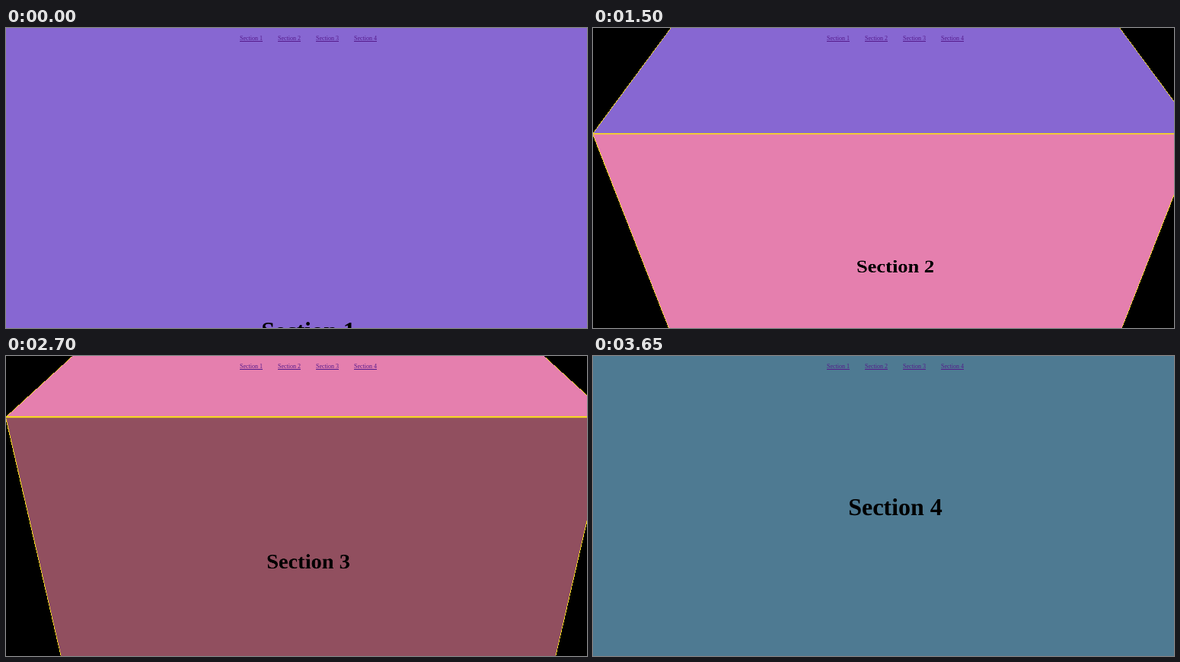
An HTML page for the animation above (4.65 s loop, 763x394 px).

```html
<!DOCTYPE html>
<html lang="en">
<head>
<meta charset="utf-8">
<title>Folding sections</title>
<style>
  html, body { margin: 0; width: 100%; height: 100%; overflow: hidden; background: #000; }
  #stage { position: relative; width: 763px; height: 394px; overflow: hidden; font-family: "Liberation Serif", Times, serif; }
  .slot { position: absolute; left: 0; top: 0; width: 794px; perspective: 500px; }
  .face { width: 100%; height: 100%; display: flex; align-items: center; justify-content: center; outline: 1px solid #f3dc1c; will-change: transform; }
  h1 { margin: 0; font-size: 32px; font-weight: bold; color: #000; white-space: nowrap; }
  nav { position: absolute; left: 0; top: 9px; width: 794px; display: flex; justify-content: center; gap: 20px; font-size: 8px; }
  nav span { color: #551a8b; text-decoration: underline; white-space: nowrap; }
  #fold { position: absolute; left: 0; top: -1px; width: 794px; height: 2px; background: #f5d52a; will-change: transform; }
</style>
</head>
<body>
<div id="stage"></div>
<script>
const LOOP = 4650, STEP = 50, VIEW = 397, NOTCH = 250;
const colors = ['#8767d2', '#e57fae', '#914f5f', '#4e7a92'];
const stage = document.getElementById('stage');

// wheel flicks: evenly spaced eased notches that carry the scroll to a new position
const flicks = [
  { start: 494, end: 744, count: 1, to: 115 },
  { start: 805, end: 1193, count: 4, to: 574 },
  { start: 1340, end: 1590, count: 1, to: 689 },
  { start: 1720, end: 1900, count: 1, to: 804 },
  { start: 2297, end: 2850, count: 2, to: 1257.5 },
  { start: 3140, end: 3650, count: 2, to: 1588 }
];

function add(parent, tag, props = {}) {
  return parent.appendChild(Object.assign(document.createElement(tag), props));
}

let end = 0;
const sections = colors.map((color, i) => {
  const height = i ? VIEW : VIEW * 2;
  const slot = add(stage, 'div', { className: 'slot' });
  const face = add(slot, 'div', { className: 'face' });
  slot.style.height = height + 'px';
  face.style.background = color;
  add(face, 'h1', { textContent: 'Section ' + (i + 1) });
  const top = end;
  end += height;
  return { slot, face, top, height };
});
const fold = add(stage, 'div', { id: 'fold' });
const nav = add(stage, 'nav');
colors.forEach((_, i) => add(nav, 'span', { textContent: 'Section ' + (i + 1) }));

function smooth(u) {
  u = Math.max(0, Math.min(1, u));
  return u * u * (3 - 2 * u);
}

function progress({ start, end, count }, t) {
  const dur = Math.min(NOTCH, end - start);
  const gap = (end - start - dur) / Math.max(1, count - 1);
  let sum = 0;
  for (let k = 0; k < count; k++) sum += smooth((t - start - k * gap) / dur);
  return sum / count;
}

function scrollAt(t) {
  let pos = 0;
  for (const flick of flicks) pos += (flick.to - pos) * progress(flick, t);
  return pos;
}

function draw(t) {
  const scroll = scrollAt(t);
  let foldY = -10;
  for (const { slot, face, top, height } of sections) {
    const y = top - scroll;
    const bottom = y + height;
    const shown = y < VIEW - 0.3 && bottom > 0.3;
    slot.style.display = shown ? 'block' : 'none';
    if (!shown) continue;
    slot.style.transform = `translateY(${y.toFixed(3)}px)`;
    // leaving faces hinge on their bottom edge, entering ones on their top
    face.style.transformOrigin = y < 0 ? '50% 100%' : '50% 0';
    face.style.transform = `rotateX(${(-90 * y / height).toFixed(4)}deg)`;
    if (y > 0.3) foldY = y;
  }
  fold.style.transform = `translateY(${foldY.toFixed(3)}px) scaleY(0.75)`;
}

function tick(now) {
  const t = now % LOOP;
  draw(Math.floor(t / STEP) * STEP);
  requestAnimationFrame(tick);
}
draw(0);
requestAnimationFrame(tick);
</script>
</body>
</html>
```
